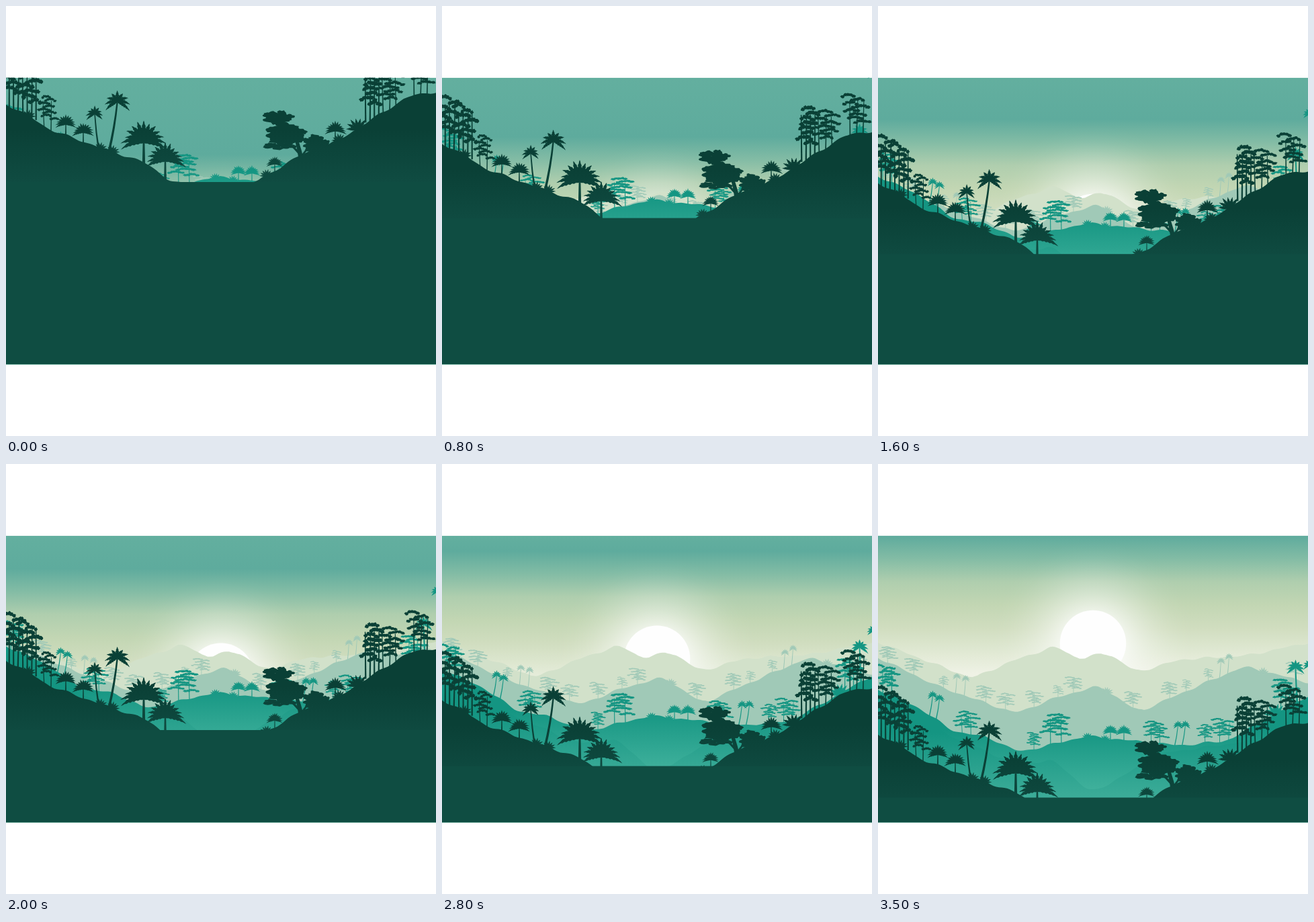
These frames come from a looping animation (640 by 640 pixels, 3.6 s). An HTML page with a canvas:

```html
<!DOCTYPE html>
<html lang="en">
<head>
<meta charset="utf-8">
<title>Jungle sunrise</title>
<style>
html, body { margin: 0; width: 100%; height: 100%; overflow: hidden; background: #fff; }
canvas { display: block; width: 640px; height: 640px; }
</style>
</head>
<body>
<canvas id="c" width="640" height="640"></canvas>
<script>
const ctx = document.getElementById('c').getContext('2d');
const LOOP = 3600, STEP = 100, END = 3500;
const W = 640, H = W * 2 / 3, TOP = (W - H) / 2;
const { PI, sin, cos, abs, max, round } = Math;

let seed = 7;
const rnd = () => (seed = (seed * 16807) % 2147483647) / 2147483647;
const jitter = d => (rnd() * 2 - 1) * d;

// All shapes are placed as they stand at the end of the pan.

function poly(pts) {
  const p = new Path2D();
  pts.forEach(([x, y]) => p.lineTo(x, y));
  p.closePath();
  return p;
}

// Height of rolling ground: straight runs between x, y pairs, softened and slightly lumpy.
function ridge(...v) {
  const line = x => {
    let i = 2;
    while (i < v.length - 2 && x > v[i]) i += 2;
    return v[i - 1] + (v[i + 1] - v[i - 1]) * (x - v[i - 2]) / (v[i] - v[i - 2]);
  };
  return x => (line(x - 8) + line(x) + line(x + 8)) / 3 + sin(x * .19) + sin(x * .11 + 1);
}

// Ground with plants on it; each plant row is [kind, size, ...places].
function land(ground, ...rows) {
  const top = [];
  for (let x = -4; x <= W + 4; x += 4) top.push([x, ground(x)]);
  const paths = [poly([...top, [W + 4, 700], [-4, 700]])];
  for (const [kind, size, ...places] of rows) {
    for (const x of places) paths.push(...kind(x, ground(x), size));
  }
  return paths;
}

function trunk(x0, y0, x1, y1, w, bend = 0) {
  const p = new Path2D(), mx = (x0 + x1) / 2 + bend, my = (y0 + y1) / 2;
  p.moveTo(x0 - w / 2, y0);
  p.quadraticCurveTo(mx - w * .4, my, x1 - w * .3, y1);
  p.lineTo(x1 + w * .3, y1);
  p.quadraticCurveTo(mx + w * .4, my, x0 + w / 2, y0);
  p.closePath();
  return p;
}

// Saw-edged leaf that rises, then bends down towards its tip.
function frond(x, y, a, len, w, droop) {
  const up = [], down = [], n = 12;
  for (let i = 0; i <= n; i++) {
    const t = i / n;
    const px = x + cos(a) * len * t;
    const py = y + sin(a) * len * t + droop * len * (t * t - .5 * t);
    const d = w * sin(PI * t ** .9) * (i % 2 ? 1 : .7);
    up.push([px + sin(a) * d, py - cos(a) * d]);
    down.unshift([px - sin(a) * d, py + cos(a) * d]);
  }
  return poly([...up, ...down]);
}

// Fronds spread evenly from angle lo to hi, given in half turns above the horizon.
function crown(x, y, r, n, lo, hi, width, droop) {
  return Array.from({ length: n }, (_, i) => {
    const a = -PI * (lo + (hi - lo) * i / (n - 1));
    return frond(x, y, a, r * (.95 + jitter(.07)), r * width, droop * (.15 + abs(cos(a))));
  });
}

function fan(x, y, r) {
  const cy = y - r * .8;
  return [trunk(x, y + 8, x, cy, max(1.2, r * .13)), ...crown(x, cy, r, 13, 0, 1, .12, .5)];
}

const coco = lean => (x, y, h) => {
  const cx = x + h * lean, cy = y - h, r = h * .28;
  return [trunk(x, y + 4, cx, cy, max(1.3, h * .055), h * lean * .2),
    ...crown(cx, cy, r, 9, -.12, 1.12, .15, .5)];
};

const bush = (x, y, r) => crown(x, y + 3, r, 8, .05, .95, .13, .15);

function blob(x, y, rx, ry) {
  return poly(Array.from({ length: 16 }, (_, i) => {
    const a = i / 8 * PI, k = 1 + jitter(.24);
    return [x + cos(a) * rx * k, y + sin(a) * ry * k];
  }));
}

// Thin trunks under flat, domed sprays of leaves; ratio is width to height.
const tree = ratio => (x, y, h) => {
  const out = [], w = h * ratio, top = y - h, n = max(1, round(h / 22));
  for (let i = 0; i < n; i++) {
    const tx = x + (i - (n - 1) / 2) * w * .6 / n;
    out.push(trunk(tx, y + 6, tx + jitter(2), top + h * .2, max(1, h * .03)));
  }
  for (let i = 0; i < 8; i++) {
    const half = w * (.2 + .08 * sin(PI * i / 8) + jitter(.04));
    const cx = x + (i % 2 ? 1 : -1) * rnd() * (w / 2 - half);
    const cy = top + h * (.06 + .64 * i / 7);
    for (let k = -2; k <= 2; k++) {
      out.push(blob(cx + k * half * .4, cy + k * k * h * .009 + jitter(h * .015), half * .3, h * .036));
    }
  }
  return out;
};

// Leafy mass of n lobes scattered in an ellipse.
function canopy(x, y, rx, ry, n) {
  return Array.from({ length: n }, (_, i) => {
    const a = i * 2.4, d = ((i + .5) / n) ** .5 * .75;
    return blob(x + cos(a) * rx * d, y + sin(a) * ry * d, rx * .3, ry * .27);
  });
}

const broadTree = () => [
  trunk(440, 495, 430, 450, 8, 4), trunk(437, 476, 403, 448, 5, 5), trunk(440, 480, 456, 458, 4),
  ...canopy(404, 423, 24, 13, 14), ...canopy(416, 446, 34, 17, 17),
  ...canopy(408, 463, 27, 9, 10), ...canopy(461, 461, 22, 14, 16)
];

const farLand = land(ridge(0, 265, 140, 319, 200, 293, 265, 271, 300, 291, 340, 280,
  385, 310, 450, 291, 550, 285, 640, 266));

const lightLand = land(ridge(0, 288, 90, 331, 205, 371, 270, 346, 330, 330, 388, 369,
  470, 333, 545, 301, 640, 325),
  [tree(1.2), 25, 15, 53, 160, 190, 232, 291, 380, 434, 620],
  [tree(.9), 18, 98, 268, 459, 492],
  [coco(.1), 24, 115, 128, 508, 520],
  [bush, 11, 340, 573]);

const midLand = land(ridge(0, 335, 65, 365, 110, 397, 165, 407, 210, 429, 310, 405,
  450, 419, 520, 412, 640, 345),
  [tree(.95), 46, 14, 606],
  [tree(1.2), 45, 265],
  [tree(1.2), 35, 132, 413, 515],
  [tree(1), 27, 232, 487],
  [coco(.19), 29, 76, 86, 441, 452],
  [coco(-.05), 50, 624],
  [fan, 13, 346, 366],
  [bush, 10, 312, 338],
  [bush, 19, 592]);

const valley = land(ridge(0, 352, 130, 415, 205, 446, 262, 441, 318, 490, 425, 430, 640, 400));

const frontLand = [
  ...land(ridge(0, 402, 40, 423, 62, 439, 155, 472, 205, 488, 250, 520, 368, 520,
    440, 477, 490, 459, 600, 390, 640, 384),
    [tree(.54), 80, 8, 35, 545],
    [tree(.65), 51, 62],
    [tree(.8), 60, 571, 617],
    [fan, 17, 89, 115, 490],
    [fan, 13, 400],
    [fan, 36, 205],
    [fan, 31, 237],
    [coco(-.12), 49, 138],
    [coco(.18), 70, 153],
    [bush, 12, 33, 140, 158, 388, 475, 496],
    [bush, 20, 524]),
  ...broadTree()
];

function ramp(y0, y1, ...colors) {
  const g = ctx.createLinearGradient(0, y0, 0, y1);
  colors.forEach((c, i) => g.addColorStop(i / (colors.length - 1), c));
  return g;
}

// Back to front; speed is in pixels per millisecond.
const layers = [
  { speed: .002, fill: '#d2e1ca', paths: farLand },
  { speed: .0182, fill: '#a0c9b7', paths: lightLand },
  { speed: .0431, fill: ramp(395, 490, '#149582', '#42b29d'), paths: midLand },
  { speed: .0431, fill: ramp(400, 495, '#149582', '#3cac98'), paths: valley },
  { speed: .0732, fill: '#149582', paths: coco(0)(642, 338, 38) },
  { speed: .0732, fill: ramp(440, 540, '#0a4036', '#114f45'), paths: frontLand }
];

function drawSky(left) {
  const rise = left * .0326, y = TOP + rise, sunY = 267 + rise;
  ctx.fillStyle = ramp(TOP, y + 1, '#63af9f', '#5eab9d');
  ctx.fillRect(0, TOP, W, H);
  ctx.fillStyle = ramp(y, y + 205, '#5eab9d', '#83bca5', '#afceae', '#c2d6b3', '#d0ddbf', '#dfe8d2', '#eff2e5');
  ctx.fillRect(0, y, W, H);

  const glow = ctx.createRadialGradient(320, sunY, 45, 320, sunY, 155);
  for (let t = 0; t <= 1; t += .125) {
    glow.addColorStop(t, `rgba(255,255,255,${.72 * (1 - t) ** 2})`);
  }
  ctx.fillStyle = glow;
  ctx.fillRect(0, TOP, W, H);
  ctx.fillStyle = '#fefefe';
  ctx.beginPath();
  ctx.arc(320, sunY, 49.3, 0, 2 * PI);
  ctx.fill();
}

function draw(t) {
  const left = END - t;
  ctx.clearRect(0, 0, W, W);
  ctx.save();
  ctx.beginPath();
  ctx.rect(0, TOP, W, H);
  ctx.clip();
  drawSky(left);
  for (const { speed, fill, paths } of layers) {
    ctx.save();
    ctx.translate(0, -left * speed);
    ctx.fillStyle = fill;
    paths.forEach(p => ctx.fill(p));
    ctx.restore();
  }
  ctx.fillStyle = '#0f4d42';
  ctx.fillRect(0, 262 + t * .067, W, H);
  ctx.restore();
}

let last = -1;
const start = performance.now();
function tick() {
  const t = Math.floor((performance.now() - start) % LOOP / STEP) * STEP;
  if (t !== last) draw(last = t);
  requestAnimationFrame(tick);
}
tick();
</script>
</body>
</html>
```
